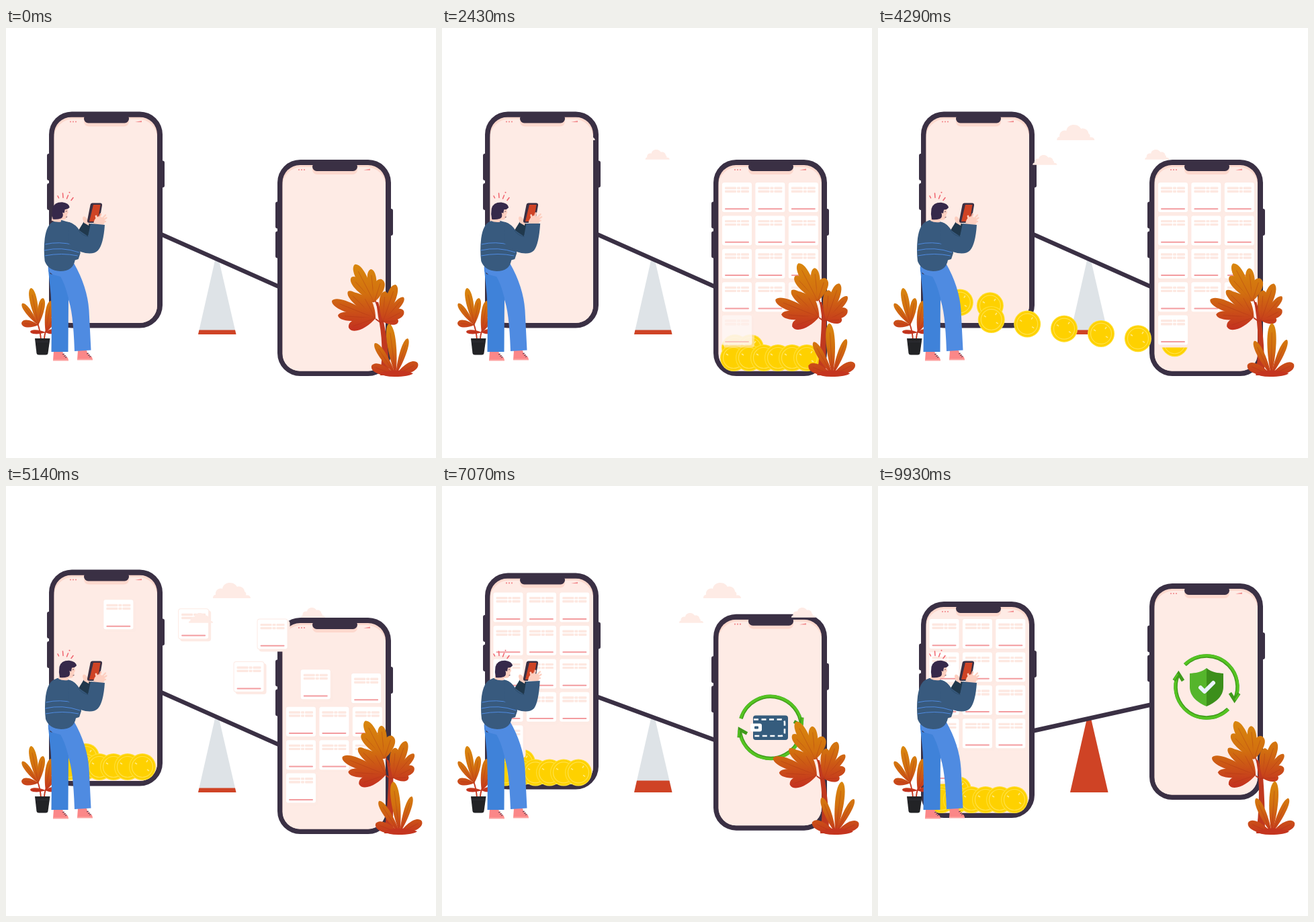
Animation, 640 px wide and 640 px high, one loop 10000 ms. Source, as an HTML page with a canvas:

```html
<!DOCTYPE html>
<html lang="en">
<head>
<meta charset="utf-8">
<title>Phone balance</title>
<style>
html, body { margin: 0; width: 100%; height: 100%; overflow: hidden; background: #fff; }
canvas { display: block; width: 640px; height: 640px; }
</style>
</head>
<body>
<canvas id="stage" width="640" height="640"></canvas>
<script>
const c = document.getElementById('stage').getContext('2d');
const LOOP = 10000;
const INK = '#3a3044', BLUSH = '#feebe5', RED = '#cf4325', SKIN = '#fdcfc0', NAVY = '#385a7e', BLUE = '#4f8be1';

const clamp = v => Math.max(0, Math.min(1, v));
const lerp = (a, b, k) => a + (b - a) * k;
const ramp = (t, a, b) => clamp((t - a) / (b - a));
const ease = k => k * k * (3 - 2 * k);
const bump = (t, a, b) => Math.sin(Math.PI * ramp(t, a, b)) ** 2;

// Piecewise linear value through [time, value] pairs.
function track(t, keys) {
  let i = 1;
  while (i < keys.length - 1 && t > keys[i][0]) i++;
  const [t0, v0] = keys[i - 1], [t1, v1] = keys[i];
  return lerp(v0, v1, (t - t0) / (t1 - t0));
}

function shape(path, color) {
  c.fillStyle = color;
  c.fill(new Path2D(path));
}
function line(path, color, width) {
  c.strokeStyle = color;
  c.lineWidth = width;
  c.stroke(new Path2D(path));
}
function box(x, y, w, h, r, color) {
  c.fillStyle = color;
  c.beginPath();
  c.roundRect(x, y, w, h, r);
  c.fill();
}
function disc(x, y, r, color) {
  c.fillStyle = color;
  c.beginPath();
  c.arc(x, y, r, 0, 7);
  c.fill();
}
function group(x, y, angle, draw) {
  c.save();
  c.translate(x, y);
  c.rotate(angle);
  draw();
  c.restore();
}
function faded(alpha, draw) {
  if (alpha <= 0) return;
  c.save();
  c.globalAlpha *= alpha;
  draw();
  c.restore();
}

function phone(x, y) {
  group(x, y, 0, () => {
    for (const by of [62.5, 106.5]) box(-3, by, 8, 40, 3, INK);
    box(164, 73, 8, 40, 3, INK);
    box(0, 0, 169, 322, 34, INK);
    c.save();
    c.beginPath();
    c.roundRect(7.5, 8, 153.5, 306.5, 26);
    c.clip();
    c.fillStyle = '#fdd8cd';
    c.fillRect(7, 8, 155, 307);
    box(7.5, 11, 153.5, 320, 28, BLUSH);
    box(52, 4, 67, 18, 7, '#fdd8cd');
    c.restore();
    box(52, 4, 67, 13, 6.5, INK);
    for (const dx of [32, 36, 40]) disc(dx, 15, 1.1, '#f2898c');
    shape('M128 15.5 L138 13.5 V15.8Z', '#f2898c');
  });
}

function seesaw(p) {
  shape('M311 346 H317 L342.5 456 H286Z', '#dee3e7');
  c.save();
  c.beginPath();
  c.rect(280, lerp(449.5, 345, p), 70, 120);
  c.clip();
  shape('M311 346 H317 L342.5 456 H286Z', RED);
  c.restore();
  const slope = Math.tan(lerp(24, -12.5, p) * Math.PI / 180);
  const pivot = 344 + 2 * p;
  line(`M225 ${pivot - 89 * slope} L412 ${pivot + 98 * slope}`, INK, 6.5);
}

function coin(x, y) {
  disc(x, y, 20, '#ffdf33');
  disc(x, y, 18.8, '#fed100');
  c.strokeStyle = '#ffe14a';
  c.lineWidth = 1.2;
  c.beginPath();
  c.arc(x, y, 15.5, 0, 7);
  c.stroke();
  line(`M${x - 11} ${y - 6} l3 2 M${x + 8} ${y - 10} l-2 3 M${x + 10} ${y + 6} l-3 -2`, '#ffea80', 1.6);
}
const coinSpots = [[436, 476], [459, 476], [434, 491], [457, 491], [479, 491], [500, 491], [521, 491], [543, 491]];

function coins(t) {
  const drop = 49 * ease(ramp(t, 6670, 8190));
  coinSpots.forEach(([x, y], i) => {
    const k = ease(ramp(t, 3460 + i * 67, 4460 + i * 67));
    faded(ramp(t, 150 + i * 67, 550 + i * 67), () => coin(x - 340 * k, y - 73 * k + drop));
  });
}

function card(x, y) {
  box(x + 2, y + 2, 46, 46, 4, '#fdeae4');
  box(x - 1, y - 1, 46, 46, 4, '#fdeae4');
  box(x, y, 44, 44, 3, '#fff');
  for (const dy of [6.5, 11.5])
    for (const [dx, w] of [[4, 17], [22, 5], [28, 12]]) box(x + dx, y + dy, w, 3.4, 1, '#fde8e1');
  box(x + 4, y + 38.3, 36, 2, 1, '#f39c9f');
}

function cards(t, p) {
  for (let i = 0; i < 13; i++) {
    const x = 417 + i % 3 * 49.4, y = 230 + Math.floor(i / 3) * 49.4;
    const k = ease(ramp(t, 4430 + i * 134, 5430 + i * 134));
    faded(ramp(t, 575 + i * 133, 1075 + i * 133), () => card(x - 340.5 * k, y - 76 * k + 44 * p));
  }
}

function arrowArc(head) {
  const start = head - 2.85, end = head - .1;
  for (const [r, width, color] of [[46, 5.5, '#3f9a1b'], [46.6, 3.8, '#55c422']]) {
    c.strokeStyle = color;
    c.lineWidth = width;
    c.beginPath();
    c.arc(0, 0, r, start, end);
    c.stroke();
  }
  group(46 * Math.cos(head), 46 * Math.sin(head), head, () => {
    c.lineJoin = 'miter';
    line('M-11 -9 L0 -3 L1 -15', '#3f9a1b', 5);
    line('M.8 -4 L1.5 -14', '#55c422', 2.5);
  });
}

function wallet() {
  box(-26, -18, 52, 36.5, 4, '#355c7d');
  c.save();
  c.setLineDash([7, 4.5]);
  line('M-25 -12 H15 Q21 -12 21 -7 V7 Q21 12.5 15 12.5 H-25', '#fff', 2.6);
  c.restore();
  box(-30, -6, 17, 12, 3, '#fff');
  box(-24, -2, 6, 4, 1, '#355c7d');
}

function shield() {
  const half = 'M0 -28 C8 -21 17 -21 25 -20 V0 C25 15 12 24 0 29Z';
  shape(half, '#3c8f1b');
  c.save();
  c.scale(-1, 1);
  shape(half, '#55b52c');
  c.restore();
  c.lineCap = 'round';
  c.lineJoin = 'round';
  line('M-9 1 L-3 7 L10 -6', '#eaf3ff', 6);
}

function icon(t, p) {
  const turn = track(t, [[5500, -138], [7070, 0], [8430, 120], [9930, 209], [10000, 213]]) * Math.PI / 180;
  const swap = ramp(t, 8900, 9250);
  faded(ramp(t, 6150, 6550), () => group(489, lerp(366.5, 299, p), 0, () => {
    arrowArc(turn);
    arrowArc(turn + Math.PI);
    faded(1 - swap, wallet);
    faded(swap, shield);
  }));
}

function cloud(x, y, scale) {
  c.save();
  c.translate(x, y);
  c.scale(scale, scale);
  shape('M-28 23 C-28 19 -26 18 -24 18 C-25 12 -20 7 -14 9 C-13 2 -7 0 -3 0 C3 0 6 3 8 6 C14 4 19 9 19 13 C21 14 22 16 21 18.5 C24 18 28 19 28 23Z', BLUSH);
  c.restore();
}

function clouds(t) {
  const x = track(t, [[0, 33], [1290, 94], [3430, 206], [5140, 290], [7070, 371], [8430, 415], [10000, 467]]);
  faded(ramp(t, 0, 300) * (1 - ramp(t, 9550, 9880)), () => {
    cloud(x + 46, 144, 1);
    cloud(x + 167, 181, .645);
    cloud(x, 189, .645);
  });
}

function warm(top, bottom) {
  const g = c.createLinearGradient(0, top, 0, bottom);
  g.addColorStop(0, '#d9870e');
  g.addColorStop(.45, '#d2700f');
  g.addColorStop(1, '#c4331f');
  return g;
}
function leaf(bx, by, tx, ty, w, paint) {
  const dx = tx - bx, dy = ty - by, len = Math.hypot(dx, dy);
  const nx = -dy / len * w, ny = dx / len * w;
  const at = (k, s) => `${bx + dx * k + nx * s} ${by + dy * k + ny * s}`;
  shape(`M${bx} ${by} C${at(.35, .65)} ${at(.95, .95)} ${tx} ${ty} C${at(.95, -.95)} ${at(.35, -.65)} ${bx} ${by}Z`, paint);
  line(`M${bx} ${by} L${at(.82, 0)}`, 'rgba(165,48,20,.5)', .7);
}
function fan(bx, by, paint, tips) {
  for (const [x, y, w] of tips) leaf(bx, by, x, y, w, paint);
}

function pottedPlant(t) {
  group(54, 464, -.09 * bump(t, 0, 1070), () => {
    c.translate(-54, -464);
    const paint = warm(387, 454);
    line('M47 440 Q51 450 52 464 M60 450 Q57 456 57 464', '#c43a22', 2);
    fan(48, 442, paint, [[37, 387, 9], [24, 410, 7], [55, 402, 8], [23, 439, 9]]);
    fan(59, 453, paint, [[67, 406, 9], [71, 431, 7], [36, 452, 5], [73, 451, 6]]);
  });
  shape('M43 462 H65.5 L62.5 484 Q62 486.5 59 486.5 H49 Q46 486.5 45.5 484Z', '#222326');
  line('M44 467 H65', '#33343a', .8);
}

function tree(t) {
  const swing = (1 - Math.cos(t * Math.PI * 2 / 3500)) / 2;
  const sway = lerp(t * .0011, 15.5, swing);
  const shift = 6 * ease(ramp(t, 1290, 5140));
  const x = 553 + sway, foot = 557 + shift;
  shape(`M${foot} 517 Q${foot + 6} 470 ${x + 1} 430 L${x - 2} 408 L${x + 1} 408 L${x + 8} 432 Q${foot + 13} 470 ${foot + 13} 517Z`, '#c0391f');
  group(sway, -sway * .15, 0, () => {
    const paint = warm(352, 447);
    line('M550 433 L557 438 L562 436 M549 404 L555 420', '#b9341d', 1.8);
    fan(548, 408, paint, [[509, 396, 9], [514, 371, 12], [519, 352, 13], [543, 359, 11], [559, 374, 13]]);
    fan(550, 432, paint, [[509, 392, 11], [531, 397, 12], [485, 406, 13], [494, 428, 11], [510, 446, 14]]);
    fan(561, 437, paint, [[564, 392, 12], [580, 382, 12], [592, 401, 9], [592, 421, 12], [584, 436, 9]]);
  });
  const bend = .25 * (1 - swing) * ramp(t, 0, 3000);
  const paint = warm(440, 519);
  const tip = (px, py, k) => {
    const a = bend * k, dx = px - 580, dy = py - 517;
    return [580 + dx * Math.cos(a) - dy * Math.sin(a), 517 + dx * Math.sin(a) + dy * Math.cos(a)];
  };
  group(shift, 0, 0, () => {
    for (const [px, py, w, k] of [[570, 440, 11, 1], [598, 462, 8, .7], [549, 469, 9, .8], [613, 499, 12, .3], [544, 503, 12, .3]])
      leaf(580, 517, ...tip(px, py, k), w, paint);
    shape('M556 514 Q580 505 606 514 Q600 519 578 519 Q562 519 556 514Z', '#c4351f');
  });
}

function shoe(x, y) {
  group(x, y, 0, () => {
    shape('M1 -1 H14 L15 2 Q19 7 22 9 L23 13 H0 Z', '#fb8788');
    line('M0 12.4 H23', '#fda3a1', 2);
    line('M14 4 l3 -1 M16 6.5 l3 -1 M18 8.5 l2.5 -1', '#3a3044', .9);
  });
}

function hand(tap) {
  group(-5 * tap, -5 * tap, 0, () => {
    c.lineCap = 'round';
    shape('M130 292 Q131 283 138 280 L146 283 Q148 288 145 293Z', SKIN);
    line('M136 288 L134 280 M138 285 L141 277', SKIN, 2.8);
    line('M142 285 L148 278.500 M143 287 L149.500 282.500 M142 289 L148 288', SKIN, 2.4);
    line('M138 281 L141 277', '#e88478', .8);
  });
}

function person(t) {
  const look = Math.max(1 - ease(ramp(t, 0, 700)), bump(t, 1700, 2700), bump(t, 7150, 8250));
  const tap = t < 8600 ? (1 - Math.cos(t * Math.PI * 2 / 860)) / 2 : 0;
  shoe(70, 482);
  shoe(106, 481);
  shape('M63 351 L101 350 Q121 385 123.500 420 L126.500 479.500 L102 481 Q100 420 92 402 Q82 375 63 362Z', BLUE);
  shape('M62.500 355 L66 390 Q68.500 410 67.500 482 H92.500 L93 402 Q87 379 81 370 L66 366Z', '#3f82d9');

  c.lineCap = 'round';
  line('M77 250 L78.500 253 M84.500 246 L85 252.500 M92.500 249 L90.500 254 M100 252.500 L97 256.500', '#f0636d', 1.5);
  disc(94.5, 244.8, 1, '#f0636d');

  shape('M108 301 L116 288 L127 292 L122 312Z', '#20384c');
  shape('M114 284 Q114 279 118 281 L124 288 L123 294 L116 290Z', SKIN);
  shape('M129 260.500 H140 Q143.500 260.500 143 264 L139 287 Q138.500 290 135.500 290 H124 Q120.500 290 121 286.500 L125.500 263.500 Q126 260.500 129 260.500Z', INK);
  shape('M130 263 H140.500 L136.500 288 H124Z', RED);
  hand(tap);

  group(-1.3 * look, 0, 0, () => {
    shape('M72 288 Q79 283 91 288 Q100 289 105 296 L112 335 L109 344 L104 345.500 Q101 362 82 362 Q64 361 59 347 Q57 330 59 313 Q62 292 72 288Z', NAVY);
    c.lineCap = 'butt';
    line('M59.500 322 Q80 317 103 323 M58.500 331 Q84 325 110 334 M59 339 Q84 334 108 339', BLUE, 1);
    group(-9 * look, -.5 * look, 0, () => {
      shape('M79 281 L93 282 L92 289 Q84 290 78 287Z', SKIN);
      shape('M90 270 L101.500 268 L103 275.500 L101.500 277 Q102 283 98 285.500 L89 286Z', SKIN);
      shape('M80 285 Q78 277 79.500 269 Q82 259.500 94 259.800 Q104 261 105 267.500 Q102 271 98 270.500 L97 276 L94.500 275 Q96.500 282 92 284 Q86 286 80 285Z', '#36294a');
      line('M99 273.500 L101 273 M99.500 282 L101.500 281.500', '#3a3044', .8);
    });
  });
  const w = 147 - 3 * tap;
  shape(`M94 289 Q104 292 110 302 L122 310 L${126 - 2 * tap} 291 L${w} ${293 - 7 * tap} Q${w - 2} 322 137 331 Q129 339 111 333 L92 320Z`, NAVY);
  line('M108 302 Q114 309 122 310.500', '#294a69', .8);
}

function draw(t) {
  const p = ease(ramp(t, 6790, 8190));
  c.fillStyle = '#fff';
  c.fillRect(0, 0, 640, 640);
  c.lineCap = 'butt';
  seesaw(p);
  phone(64, 124.5 + 47.5 * p);
  phone(404, 196 - 51 * p);
  coins(t);
  icon(t, p);
  cards(t, p);
  clouds(t);
  pottedPlant(t);
  tree(t);
  person(t);
}

const began = performance.now();
function frame() {
  draw((performance.now() - began) % LOOP);
  requestAnimationFrame(frame);
}
frame();
</script>
</body>
</html>
```
